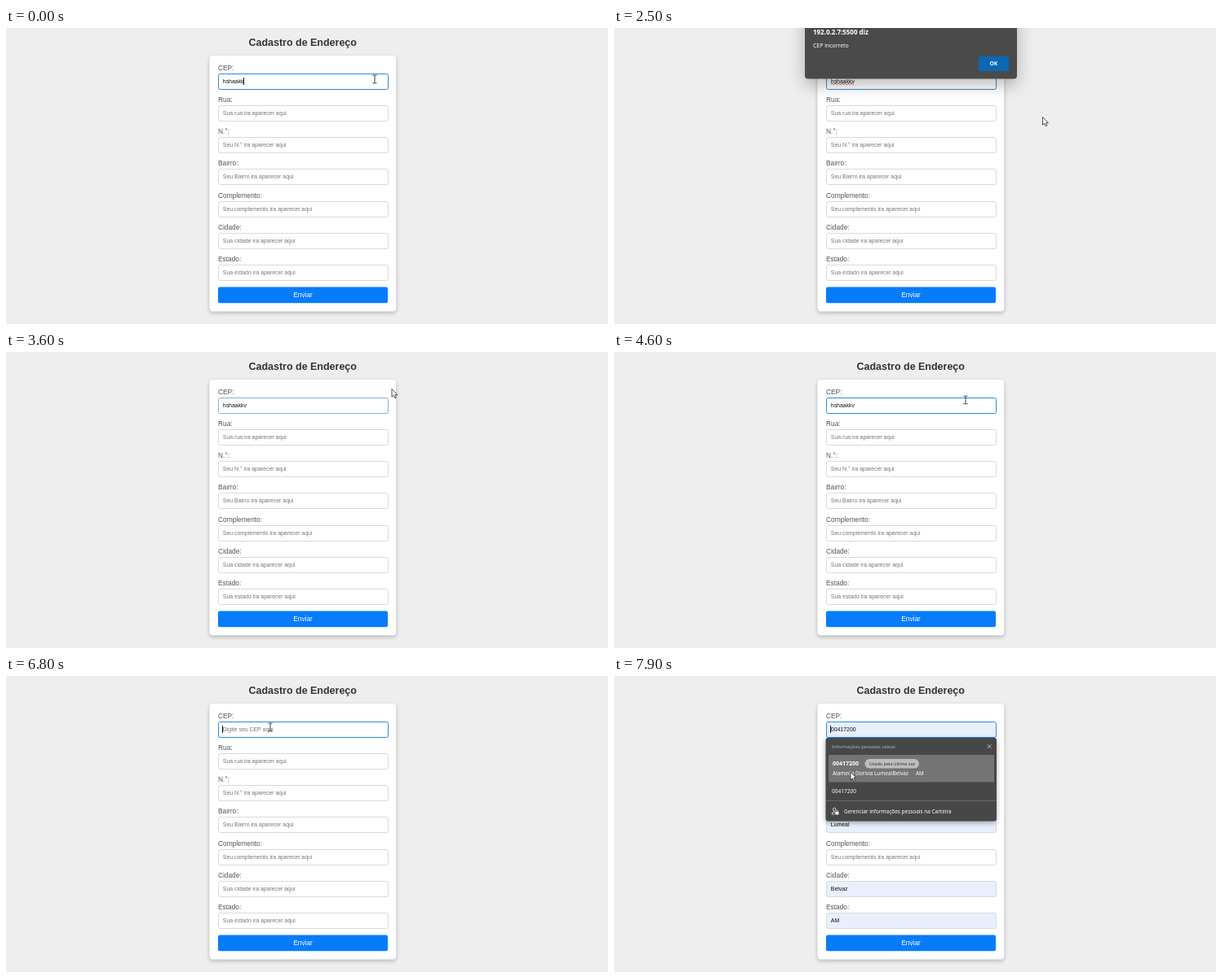
These frames come from a looping animation (738 by 364 pixels, 8 s). An HTML page:

```html
<!DOCTYPE html>
<html lang="pt-BR">
<head>
<meta charset="utf-8">
<title>Cadastro de Endereço</title>
<style>
  html, body { margin: 0; width: 100%; height: 100%; overflow: hidden; background: #eee; }
  svg { display: block; width: 738px; height: 364px; }
  text { font-family: "Liberation Sans", Arial, sans-serif; white-space: pre; }
  .label { font-size: 8.32px; fill: #555; }
  .value { font-size: 6.93px; }
  .ui text { font-family: "Noto Sans", "Open Sans", sans-serif; fill: #fff; }
  .ui .bold { font-weight: 700; }
  #card { filter: drop-shadow(0 2px 2.5px rgba(0, 0, 0, .24)); }
  #dialogBox { filter: drop-shadow(0 7px 10px rgba(0, 0, 0, .28)); }
  #popupBox { filter: drop-shadow(0 2px 3px rgba(0, 0, 0, .35)); }
</style>
</head>
<body>
<svg viewBox="0 0 738 364">
  <rect width="738" height="364" fill="#eee"/>
  <text x="363.7" y="22.4" text-anchor="middle" font-size="12.48" font-weight="700" fill="#333">Cadastro de Endereço</text>
  <rect id="card" x="249.5" y="34" width="228.7" height="314.5" rx="4.2" fill="#fff"/>
  <g id="fields"></g>
  <path id="squiggle" fill="none" stroke="#e0453c" stroke-width=".8"/>
  <rect id="caret" y="61" width="1" height="9" fill="#111"/>
  <rect x="260" y="318.5" width="208" height="19.8" rx="2.1" fill="#067cfa"/>
  <text x="364" y="331.3" text-anchor="middle" font-size="8.32" fill="#fff">Enviar</text>

  <g id="dialog" class="ui">
    <rect id="dialogBox" x="234" y="-20" width="260" height="82.6" rx="4" fill="#4a4a4a"/>
    <text class="bold" x="244" y="7.6" font-size="7.95">192.0.2.7:5500 diz</text>
    <text x="244" y="23.5" font-size="6.9">CEP incorreto</text>
    <rect x="447" y="35" width="37" height="18" rx="1.5" fill="#0a68b4"/>
    <text class="bold" x="465.3" y="46.4" text-anchor="middle" font-size="6.7">OK</text>
  </g>

  <g id="popup" class="ui">
    <rect id="popupBox" x="259.5" y="76" width="209.5" height="102.5" rx="3" fill="#474747"/>
    <text x="267" y="88.6" font-size="5.85" style="fill:#b4b4b4">Informações pessoais salvas</text>
    <path d="M457.8 84.2l4.6 4.6m0-4.6l-4.6 4.6" stroke="#ddd" stroke-width=".8"/>
    <rect id="row" x="263" y="97" width="203" height="33.5" rx="1" fill="#747474"/>
    <text class="bold" id="rowCode" x="268" y="109.8" font-size="7"></text>
    <rect id="badge" x="307.5" y="102" width="66.5" height="11.6" rx="5.8"/>
    <text id="badgeText" x="341" y="109.8" text-anchor="middle" font-size="5.5" font-weight="500">Usado pela última vez</text>
    <g id="address" font-size="6.4"></g>
    <text id="otherCode" x="267" y="143.9" font-size="6.55"></text>
    <path d="M260 153.5H469" stroke="#696969"/>
    <g fill="none" stroke="#eee" stroke-width=".8">
      <circle cx="270.2" cy="164" r="1.8"/>
      <path d="M270.6 170H267.4V169Q267.4 167.4 269 167.4H271M272.4 167.4V166.4a1 1 0 0 1 2 0V167.4"/>
    </g>
    <rect x="271.3" y="167" width="4.2" height="3.4" rx=".5" fill="#eee"/>
    <text x="282" y="168.6" font-size="6.45">Gerenciar informações pessoais na Carteira</text>
  </g>

  <path id="arrow" d="M0 0V9.8L2.2 7.8L3.8 11.3L5.4 10.6L3.9 7.2H6.9Z" fill="#fff" stroke="#222" stroke-width=".8" stroke-linejoin="round"/>
  <path id="beam" d="M-2.5-4.8H-.6L0-4.3L.6-4.8H2.5M0-4.3V4.3M-2.5 4.8H-.6L0 4.3L.6 4.8H2.5" fill="none" stroke="#222" stroke-width=".9"/>
</svg>
<script>
const $ = id => document.getElementById(id);
const LOOP = 8000, STEP = 100, PITCH = 39.15;
const CODE = "00417200", STREET = "Alameda Dorívia", AREA = "Lumeal", CITY = "Belvaz", STATE = "AM";

// label, placeholder, autofill preview
const form = [
  ["CEP:", "Digite seu CEP aqui", CODE],
  ["Rua:", "Sua rua ira aparecer aqui", STREET],
  ["N.°:", "Seu N.° ira aparecer aqui", ""],
  ["Bairro:", "Seu Bairro ira aparecer aqui", AREA],
  ["Complemento:", "Seu complemento ira aparecer aqui", ""],
  ["Cidade:", "Sua cidade ira aparecer aqui", CITY],
  ["Estado:", "Sua estado ira aparecer aqui", STATE]
];

function add(parent, tag, attrs, content = "") {
  const node = document.createElementNS("http://www.w3.org/2000/svg", tag);
  for (const key in attrs) node.setAttribute(key, attrs[key]);
  node.textContent = content;
  return parent.appendChild(node);
}

const fields = form.map(([label, hint, fill], i) => {
  const dy = PITCH * i;
  add($("fields"), "text", { class: "label", x: 260, y: 52 + dy }, label);
  const box = add($("fields"), "rect", {
    x: 260.5, y: Math.round(56 + dy) + .5, width: 208, height: 19, rx: 2
  });
  const text = add($("fields"), "text", { class: "value", x: 265.8, y: 68 + dy });
  return { box, text, hint, fill };
});

[[268, STREET], [319, AREA], [341.5, CITY], [370, STATE]]
  .forEach(([x, s]) => add($("address"), "text", { x, y: 122 }, s));
$("rowCode").textContent = $("otherCode").textContent = CODE;

let wave = "M266 69.6";
for (let i = 0; i < 14; i++) wave += `l1 ${i % 2 ? 1.2 : -1.2}l1 0`;
$("squiggle").setAttribute("d", wave);

// time, x, y of the pointer hot spot
const path = [
  [0, 452, 63], [1000, 452, 63], [1300, 479.5, 85.5], [1400, 479.5, 85.5],
  [1700, 529, 115], [2400, 529, 115], [2500, 525.5, 109.5], [3100, 473, 45.5],
  [3600, 473, 45.5], [4100, 431, 59], [6000, 431, 59], [6600, 323, 66],
  [6800, 324, 63], [7400, 324, 63], [7600, 315, 77], [7900, 290, 118], [8000, 290, 118]
];

// time, typed text
const typing = [
  [0, "hshaakk"], [100, "hshaakkv"], [4800, "hshaakk"], [5300, "hshaak"],
  [5400, "hsha"], [5500, "h"], [5600, ""]
];

const caretOn = [[0, 600], [1100, 1600], [4300, 4600], [5000, 6000], [6500, LOOP]];

const within = (t, a, b) => t >= a && t < b;
const show = (id, on) => $(id).setAttribute("display", on ? "inline" : "none");

function pointerAt(t) {
  const i = Math.max(1, path.findIndex(p => p[0] >= t));
  const [t0, x0, y0] = path[i - 1], [t1, x1, y1] = path[i];
  const k = (t - t0) / (t1 - t0);
  return [x0 + (x1 - x0) * k, y0 + (y1 - y0) * k];
}

function borderAt(t) {
  if (t === 3600 || t === 4300) return "#7fb1de";
  return within(t, 3700, 4300) ? "#d6d6d6" : "#2f88da";
}

function render(t) {
  const [x, y] = pointerAt(t);
  const dialog = within(t, 1800, 3600), popup = t >= 7100;
  const hover = popup && y > 97;
  const typed = typing.filter(k => k[0] <= t).pop()[1];

  fields.forEach(({ box, text, hint, fill }, i) => {
    const value = hover && fill ? fill : i ? "" : typed;
    text.textContent = value || hint;
    text.setAttribute("fill", value ? "#111" : "#757575");
    box.setAttribute("fill", hover && fill ? "#e8f0fe" : "#fff");
    box.setAttribute("stroke", i ? "#d9d9d9" : borderAt(t));
  });

  const width = typed ? fields[0].text.getComputedTextLength() : 0;
  $("caret").setAttribute("x", Math.round(265.3 + width));
  show("caret", caretOn.some(([a, b]) => within(t, a, b)));
  show("squiggle", within(t, 800, 3600));
  show("dialog", dialog);
  show("popup", popup);
  show("row", hover);
  $("badge").setAttribute("fill", hover ? "#bdbdbd" : "#4f5b66");
  $("badgeText").style.fill = hover ? "#333" : "#fff";

  const inField = !dialog && within(x, 260, 469) && within(y, 56, 76);
  show("beam", inField);
  show("arrow", !inField);
  for (const id of ["beam", "arrow"]) $(id).setAttribute("transform", `translate(${x} ${y})`);
}

const start = performance.now();
function tick() {
  const t = (performance.now() - start) % LOOP;
  render(Math.floor(t / STEP) * STEP);
  requestAnimationFrame(tick);
}
tick();
</script>
</body>
</html>
```
